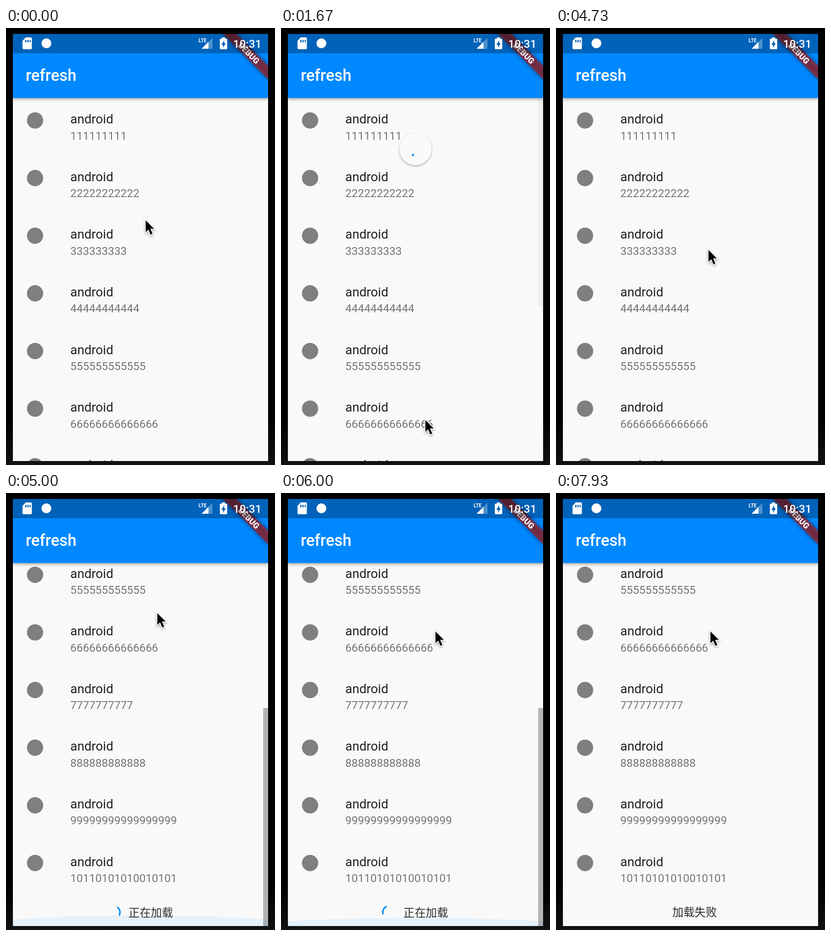
An HTML page for the animation above (8000 ms loop, 546 by 884 pixels).

```html
<!DOCTYPE html>
<html lang="en">
<head>
<meta charset="utf-8">
<title>Pull to refresh</title>
<style>
  html, body { margin: 0; width: 100%; height: 100%; overflow: hidden; background: #000; }
  svg { display: block; width: 546px; height: 884px; font-family: Roboto, sans-serif; }
  .title { font-size: 25.9px; fill: #212121; }
  .sub { font-size: 22.66px; fill: #757575; }
  .footer { font: 22.66px "Noto Sans CJK SC", "Noto Sans CJK", sans-serif; fill: #2b2b2b; }
  .arc { fill: none; stroke: #0a90f5; stroke-linecap: square; }
  .bar { filter: drop-shadow(0 2px 3px rgba(0, 0, 0, .4)); }
  .disc { filter: drop-shadow(0 2px 2px rgba(0, 0, 0, .3)); }
  .shade { filter: blur(5px); }
  #cursor { filter: drop-shadow(0 2px 2px rgba(0, 0, 0, .35)); }
</style>
</head>
<body>
<svg viewBox="0 0 546 884">
  <defs>
    <clipPath id="screen"><rect x="14" y="12" width="518" height="864"/></clipPath>
    <linearGradient id="edge" x2="0" y2="1">
      <stop offset=".9" stop-color="#000"/><stop offset="1" stop-color="#121212"/>
    </linearGradient>
  </defs>
  <rect width="546" height="884" fill="url(#edge)"/>
  <g clip-path="url(#screen)">
    <rect x="14" y="12" width="518" height="864" fill="#f9f9f9"/>
    <g id="list">
      <g id="rows"></g>
      <g id="loading">
        <path id="loadArc" class="arc" stroke-width="3.2"/>
        <text class="footer" x="248.5" y="1345">正在加载</text>
      </g>
      <text id="failed" class="footer" x="236" y="1344">加载失败</text>
    </g>
    <ellipse id="glow" cx="273" rx="777" fill="#0a88f5" opacity=".08"/>
    <rect id="thumb" x="522" width="10"/>
    <g id="refresh">
      <circle class="disc" r="32.5" fill="#fafafa"/>
      <path id="refreshArc" class="arc" stroke-width="4"/>
      <path id="arrow" d="M-6 0H6L0 6.5Z" fill="#0a90f5"/>
    </g>

    <rect class="bar" x="14" y="12" width="518" height="129.5" fill="#08f"/>
    <text x="39.9" y="107.4" font-size="32.4" font-weight="500" fill="#fff">refresh</text>
    <g transform="translate(532 12) rotate(45)">
      <rect class="shade" x="-65" y="45.4" width="130" height="19.4" opacity=".5"/>
      <rect x="-65" y="45.4" width="130" height="19.4" fill="#b71c1c" opacity=".63"/>
      <text y="61" font-size="16.5" font-weight="900" fill="#fff" text-anchor="middle">DEBUG</text>
    </g>

    <rect x="14" y="12" width="518" height="39" opacity=".28"/>
    <g fill="#fff">
      <path fill-rule="evenodd" d="M40 19H50Q52.5 19 52.5 21.5V41Q52.5 43 50 43H36Q33.5 43 33.5 41V26ZM39 24V29H41.500V24ZM43.5 24V29H46V24ZM48 24V29H50V24Z"/>
      <circle cx="82" cy="31" r="10"/>
      <text x="391" y="29" font-size="10" font-weight="700">LTE</text>
      <path d="M397 42L419 20V42Z" opacity=".3"/>
      <path d="M397 42L411 28V42Z"/>
      <path fill-rule="evenodd" d="M438.5 19H444.5V21.5H447Q449 21.5 449 23.5V41Q449 43 447 43H436Q434 43 434 41V23.5Q434 21.5 436 21.5H438.5ZM443 25L437 34H440.5V40L446 31H443Z"/>
      <text x="461" y="40" font-size="22.66" font-weight="500">10:31</text>
    </g>
  </g>
  <path id="cursor" d="M1.5 3V27L7 21.7L11.5 32L15.5 30.3L11 20H18.5Z"
        stroke="#fff" stroke-width="3" paint-order="stroke"/>
</svg>
<script>
const LOOP = 8000, ROW = 116.6, TOP = 141.5, BOTTOM = 876, MAX_SCROLL = 488;
const el = Object.fromEntries([...document.querySelectorAll('[id]')].map(n => [n.id, n]));
const set = (node, attrs) => { for (const k in attrs) node.setAttribute(k, attrs[k]); };
const show = (node, on) => set(node, { visibility: on ? 'visible' : 'hidden' });

const clamp = x => Math.min(1, Math.max(0, x));
const linear = x => x;
const easeOut = x => 1 - (1 - x) ** 2;

// cubic-bezier(.4, 0, .2, 1)
function standard(x) {
  let lo = 0, hi = 1;
  for (let i = 0; i < 18; i++) {
    const u = (lo + hi) / 2, v = 1 - u;
    if (1.2 * v * v * u + .6 * v * u * u + u ** 3 < x) lo = u; else hi = u;
  }
  return 3 * (1 - lo) * lo * lo + lo ** 3;
}

// Goes from 0 to 1 between two times
const ramp = (t, from, to, ease = linear) => ease(clamp((t - from) / (to - from)));
// Fades in at one time and out at another
const pulse = (t, on, off) => ramp(t, on, on + 300, standard) - ramp(t, off, off + 300, standard);

// Indeterminate arc: one sweep per second, each starting 144 degrees further back
function spin(clock) {
  const p = clock % 1, step = Math.floor(clock) % 5;
  const head = standard(clamp(p * 2)), tail = standard(clamp(p * 2 - 1));
  const from = -90 + 270 * tail + 306 * p - 144 * step;
  return { from, to: from + Math.max(270 * (head - tail), .1) };
}

function arcPath(cx, cy, r, { from, to }) {
  const at = deg => {
    const a = deg * Math.PI / 180;
    return `${cx + r * Math.cos(a)} ${cy + r * Math.sin(a)}`;
  };
  return `M${at(from)}A${r} ${r} 0 ${to - from > 180 ? 1 : 0} 1 ${at(to)}`;
}

function drawRefresh(t) {
  const dragging = t < 1020;
  const pull = 1.5 * ramp(t, 670, 785) - .5 * ramp(t, 870, 1020);
  const scale = 1 - ramp(t, 4024, 4224);
  const arc = spin(dragging ? pull / 4 : (t - 710) / 1000);
  const visible = pull > 0 && scale > 0;
  show(el.refresh, visible);
  show(el.arrow, visible && dragging);
  set(el.refresh, { transform: `translate(273 ${101 + 144 * pull}) scale(${scale})` });
  set(el.refreshArc, { d: arcPath(0, 0, 13, arc) });
  set(el.arrow, { transform: `rotate(${arc.to}) translate(13 0)` });
}

function drawList(t) {
  const part = ramp(t, 4740, 4980, easeOut);
  const length = 420.5 + 20.5 * part;
  const failed = t >= 7925;
  set(el.list, { transform: `translate(0 ${-MAX_SCROLL * part})` });
  set(el.thumb, {
    y: TOP + (BOTTOM - TOP - length) * part, height: length,
    opacity: .28 * (pulse(t, 690, 1500) + pulse(t, 4740, 6480))
  });
  show(el.loading, !failed);
  show(el.failed, failed);
  set(el.loadArc, { d: arcPath(219, 1336, 12.4, spin(Math.max(0, t - 4868) / 1000)) });
}

// The overscroll glow rises when the list hits its end, then sinks
function drawGlow(t) {
  const size = .6 * ramp(t, 4960, 5080) * (1 - ramp(t, 4960, 6350));
  set(el.glow, { cy: BOTTOM + 667 * size, ry: 777 * size });
}

function drawCursor(t) {
  const x = 282 + 26 * ramp(t, 1540, 1900) - 8 * ramp(t, 4812, 5440) + 12 * ramp(t, 5520, 5760);
  const y = 386 + 534 * ramp(t, 655, 690) - 357 * ramp(t, 1540, 1900)
    - 323 * ramp(t, 4685, 4812) + 238 * ramp(t, 5080, 5440) - 201 * ramp(t, 5520, 5760);
  set(el.cursor, { transform: `translate(${x} ${y})` });
}

const subtitles = ('111111111 22222222222 333333333 44444444444 555555555555 66666666666666 '
  + '7777777777 888888888888 99999999999999999 10110101010010101').split(' ');
el.rows.innerHTML = subtitles.map((sub, i) => `
  <g transform="translate(0 ${TOP + ROW * i})">
    <circle cx="59" cy="45.5" r="16.5" fill="#7f7f7f"/>
    <text class="title" x="130.6" y="51.8">android</text>
    <text class="sub" x="130.6" y="84.2">${sub}</text>
  </g>`).join('');

const start = performance.now();
function tick() {
  const t = (performance.now() - start) % LOOP;
  for (const draw of [drawList, drawGlow, drawRefresh, drawCursor]) draw(t);
  requestAnimationFrame(tick);
}
tick();
</script>
</body>
</html>
```
